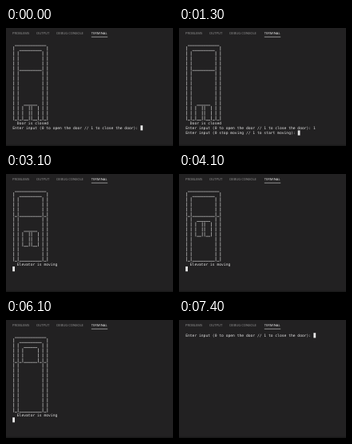
An HTML page that plays this animation: 209 px wide and 148 px high, repeating every 7600 ms.

```html
<!DOCTYPE html>
<html lang="en">
<head>
<meta charset="utf-8">
<title>Elevator in a terminal</title>
<style>
  html, body { margin: 0; width: 100%; height: 100%; overflow: hidden; background: #222122; }
  svg { display: block; width: 100%; height: 100%; }
  .tab { font: 4.1px "Open Sans", sans-serif; fill: #9a9a9a; }
  .tab.on { fill: #f0f0f0; }
  .out { font: 4.67px "DejaVu Sans Mono", monospace; fill: #e6e6e6; }
  #art { fill: none; stroke: #cfcfcf; stroke-width: .65; }
</style>
</head>
<body>
<svg viewBox="0 0 209 148">
  <rect width="209" height="148" fill="#222122"/>
  <rect y="146.5" width="209" height="1.5" fill="#1a1a1a"/>
  <text class="tab" x="8" y="7.6">PROBLEMS</text>
  <text class="tab" x="38" y="7.6">OUTPUT</text>
  <text class="tab" x="63.3" y="7.6">DEBUG CONSOLE</text>
  <text class="tab on" x="106.8" y="7.6">TERMINAL</text>
  <rect x="106.8" y="10.8" width="20.4" height=".6" fill="#dcdcdc"/>
  <path id="art"/>
  <g id="lines"></g>
  <rect id="cursor" width="2.8" height="6.2" fill="#e8e8e8"/>
</svg>
<script>
const LOOP = 7600;
const LEFT = 8.2, TOP = 16.2, CELL = 2.81, ROW = 6.235;
const DOOR = "Enter input (0 to open the door // 1 to close the door): ";
const MOVE = "Enter input (0 stop moving // 1 to start moving): ";
const CLOSED = "  Door is closed", MOVING = "  Elevator is moving";

const $ = id => document.getElementById(id);
const colX = c => LEFT + c * CELL;
const rowY = r => TOP + r * ROW;

// Shaft as rows of characters, with the car's roof at row `car`.
function shaft({ car, last, floor, open }) {
  const rows = [" " + "_".repeat(14), "|  " + "_".repeat(10) + "  |"];
  for (let r = 2; r <= last; r++) {
    const full = r === last || (r === 5 && floor);
    const gap = full ? "_" : " ";
    const fill = full || r === 5 ? "_" : " ";
    let inner = fill.repeat(10);
    if (r === car) inner = fill.repeat(2) + "______" + fill.repeat(2);
    if (r > car && r <= car + 3) {
      const leaf = (r === car + 3 ? "_" : " ").repeat(2);
      inner = fill + "|" + leaf + (open ? leaf : "||") + leaf + "|" + fill;
    }
    rows.push("|" + gap + "|" + inner + "|" + gap + "|");
  }
  return rows;
}

function strokes(rows) {
  let d = "";
  rows.forEach((row, r) => [...row].forEach((ch, c) => {
    const x = colX(c), y = rowY(r);
    if (ch === "|") d += `M${x + CELL / 2} ${y + .6}v5.5`;
    if (ch === "_") d += `M${x} ${y + 5.9}h${CELL}`;
  }));
  return d;
}

const idle = { car: 12, last: 15, floor: false };
const ride = (car, last = 14, open = false) =>
  ({ art: { car, last, floor: true, open }, text: [MOVING, ""] });

const scenes = [
  [0, { art: idle, text: [CLOSED, DOOR] }],
  [800, { art: idle, text: [CLOSED, DOOR + "1"] }],
  [1300, { art: idle, text: [CLOSED, DOOR + "1", MOVE] }],
  [1600, { art: idle, text: [CLOSED, DOOR + "1", MOVE + "1"] }],
  [2100, { art: idle, text: [CLOSED, DOOR + "1", MOVE + "1", ""] }],
  [3100, ride(8)],
  [4100, ride(6)],
  [5100, ride(4)],
  [6100, ride(2, 15, true)],
  [7100, { text: [DOOR] }]
];

let shown;
function draw(ms) {
  const t = ms % LOOP;
  const scene = scenes.filter(([at]) => at <= t).pop()[1];
  if (scene === shown) return;
  shown = scene;
  const rows = scene.art ? shaft(scene.art) : [];
  $("art").setAttribute("d", strokes(rows));
  $("lines").innerHTML = scene.text.map((line, i) => {
    const indent = line.length - line.trimStart().length;
    return `<text class="out" x="${colX(indent)}" y="${rowY(rows.length + i) + 4.8}">${line.trim()}</text>`;
  }).join("");
  $("cursor").setAttribute("x", colX(scene.text.at(-1).length));
  $("cursor").setAttribute("y", rowY(rows.length + scene.text.length - 1));
}

const start = performance.now();
function tick() {
  draw(performance.now() - start);
  requestAnimationFrame(tick);
}
tick();
</script>
</body>
</html>
```
